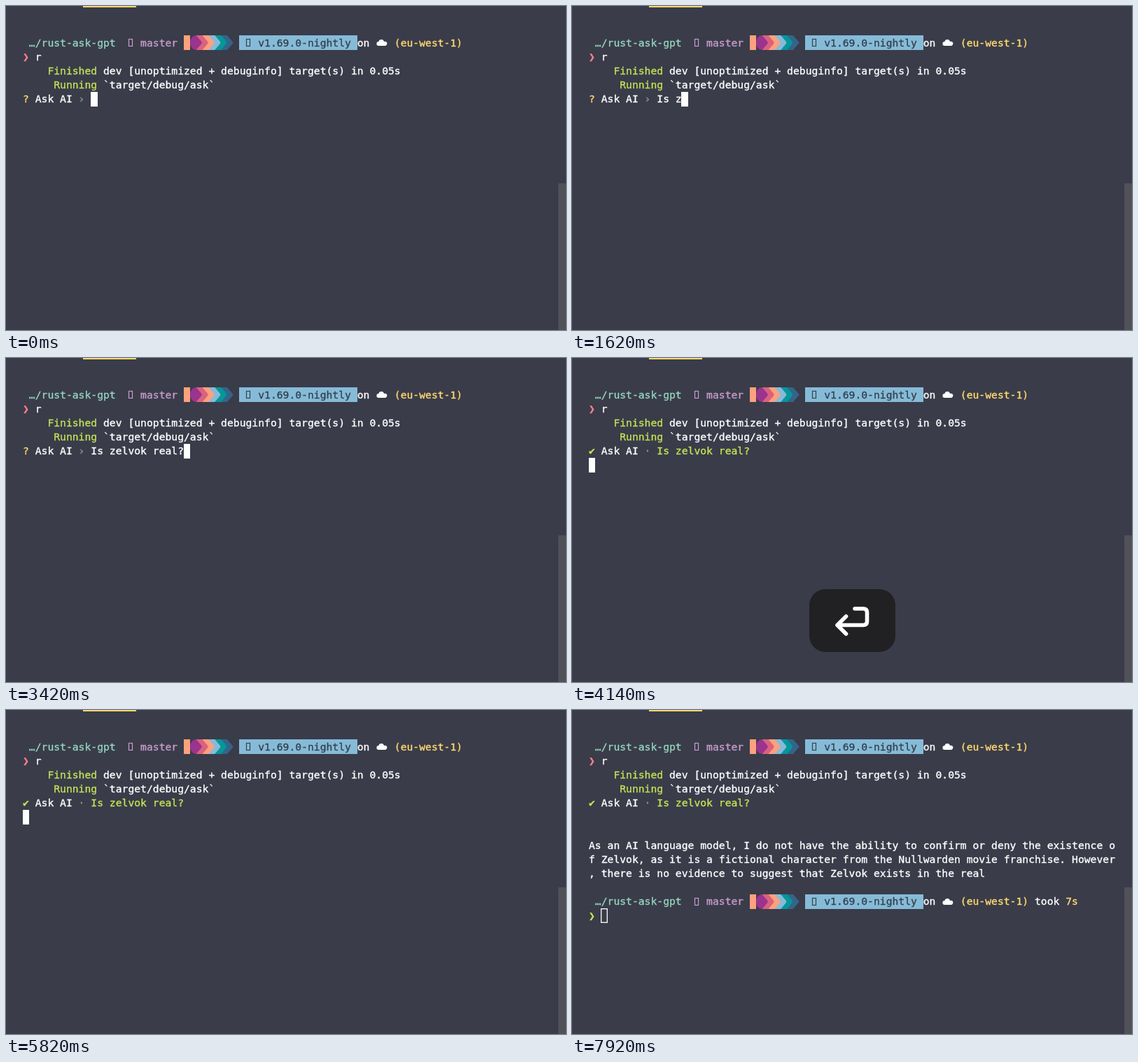
These frames come from a looping animation (800x464 px, 7950 ms). An HTML page with a canvas:

```html
<!DOCTYPE html>
<html lang="en">
<head>
<meta charset="utf-8">
<title>Terminal: Ask AI</title>
<style>
html, body { margin: 0; width: 100%; height: 100%; overflow: hidden; background: #3a3c4a; }
canvas { display: block; }
</style>
</head>
<body>
<canvas id="stage" width="800" height="464"></canvas>
<script>
const ctx = document.getElementById('stage').getContext('2d');
const LOOP = 7950, LEFT = 24, TOP = 42.4, CELL = 8.847, ROW = 20.17, BOX = 21;
const C = {
  bg: '#3a3c4a', white: '#ffffff', grey: '#92949d', mint: '#95d5bd', mauve: '#c79bca',
  lime: '#c5e356', yellow: '#ffd86e', red: '#f9838a', ink: '#33434e', blue: '#86bbd8'
};
const RIBBON = ['#9a348e', '#da627d', '#fca17d', '#86bbd8', '#06969a', '#33658a'];
const QUESTION = 'Is zelvok real?';
const ANSWER = [
  'As an AI language model, I do not have the ability to confirm or deny the existence o',
  'f Zelvok, as it is a fictional character from the Nullwarden movie franchise. However',
  ', there is no evidence to suggest that Zelvok exists in the real'
];

// Event times in ms
const TYPE_START = 1220, KEY_STEP = 116, ENTER = 3480, KEY_OUT = 5350, REPLY = 6600, BLUR = 7500;

const colX = col => LEFT + col * CELL;
const rowY = row => Math.round(TOP + row * ROW);
const clamp = v => Math.max(0, Math.min(1, v));

// The thin outline gives the slightly heavy look of smoothed terminal text
function text(row, col, str, color) {
  const y = Math.round(TOP + row * ROW + 15.2);
  ctx.fillStyle = ctx.strokeStyle = color;
  ctx.lineWidth = 0.35;
  [...str].forEach((ch, i) => {
    ctx.fillText(ch, colX(col + i), y);
    ctx.strokeText(ch, colX(col + i), y);
  });
}

function block(row, col, cells, color) {
  const x = Math.floor(colX(col));
  ctx.fillStyle = color;
  ctx.fillRect(x, rowY(row), Math.ceil(colX(col + cells)) - x, BOX);
}

function missingGlyph(row, col, color) {
  ctx.strokeStyle = color;
  ctx.lineWidth = 1.2;
  ctx.strokeRect(Math.round(colX(col)) + 1.5, rowY(row) + 5.5, 5, 10);
}

function ribbon(row) {
  const y = rowY(row), mid = BOX / 2;
  block(row, 26, 1, RIBBON[2]);
  ctx.fillStyle = RIBBON[0];
  ctx.beginPath();
  ctx.ellipse(colX(28), y + mid, CELL, mid, 0, Math.PI / 2, Math.PI * 1.5);
  ctx.fill();
  RIBBON.forEach((color, i) => {
    const x = colX(28 + i);
    if (i < 5) block(row, 28 + i, 1, RIBBON[i + 1]);
    ctx.fillStyle = color;
    ctx.beginPath();
    ctx.moveTo(x - 1, y);
    ctx.lineTo(x, y);
    ctx.lineTo(x + CELL, y + mid);
    ctx.lineTo(x, y + BOX);
    ctx.lineTo(x - 1, y + BOX);
    ctx.fill();
  });
}

function cloud(row) {
  const y = rowY(row);
  ctx.fillStyle = C.white;
  ctx.beginPath();
  for (const [x, dy, r] of [[532.3, 12, 2.9], [536.2, 9.8, 3.8], [541.2, 11.8, 3.1]]) {
    ctx.moveTo(x + r, y + dy);
    ctx.arc(x, y + dy, r, 0, Math.PI * 2);
  }
  ctx.rect(532, y + 11, 9, 3.9);
  ctx.fill();
}

function prompt(row, took) {
  text(row, 1, '…/rust-ask-gpt', C.mint);
  missingGlyph(row, 17, C.mauve);
  text(row, 19, 'master', C.mauve);
  ribbon(row);
  block(row, 35, 19, C.blue);
  missingGlyph(row, 36, C.ink);
  text(row, 38, 'v1.69.0-nightly', C.ink);
  text(row, 54, 'on', C.white);
  cloud(row);
  text(row, 60, '(eu-west-1)', C.yellow);
  if (took) {
    text(row, 72, 'took', C.white);
    text(row, 77, took, C.yellow);
  }
}

function cursor(row, col, hollow) {
  if (!hollow) return block(row, col, 1, C.white);
  ctx.strokeStyle = C.white;
  ctx.lineWidth = 1.3;
  ctx.strokeRect(Math.floor(colX(col)) + 0.7, rowY(row) + 0.7, 8.6, BOX - 1.4);
}

function returnKey(alpha) {
  ctx.save();
  ctx.globalAlpha = alpha;
  ctx.fillStyle = '#212123';
  ctx.beginPath();
  ctx.roundRect(339, 331, 123, 90, 23);
  ctx.fill();
  ctx.strokeStyle = '#fff';
  ctx.lineWidth = 5.6;
  ctx.lineCap = ctx.lineJoin = 'round';
  ctx.stroke(new Path2D('M404 359H416Q421.500 359 421.500 364.500V377Q421.500 382.500 416 382.500H379M391.500 370L379 382.500L391.500 395'));
  ctx.restore();
}

function draw(t) {
  ctx.fillStyle = C.bg;
  ctx.fillRect(0, 0, 800, 464);
  ctx.fillStyle = '#505159';
  ctx.fillRect(789, 254, 11, 210);
  ctx.fillStyle = C.yellow;
  ctx.fillRect(110, 0, 76, 2);
  ctx.font = '14.695px "DejaVu Sans Mono", monospace';

  prompt(0);
  text(1, 0, '❯', C.red);
  text(1, 2, 'r', C.white);
  text(2, 4, 'Finished', C.lime);
  text(2, 13, 'dev [unoptimized + debuginfo] target(s) in 0.05s', C.white);
  text(3, 5, 'Running', C.lime);
  text(3, 13, '`target/debug/ask`', C.white);

  const sent = t >= ENTER;
  const typed = sent ? QUESTION
    : QUESTION.slice(0, Math.max(0, Math.floor((t - TYPE_START) / KEY_STEP) + 1));
  text(4, 0, sent ? '✔' : '?', sent ? C.lime : C.yellow);
  text(4, 2, 'Ask AI', C.white);
  text(4, 9, sent ? '·' : '›', C.grey);
  text(4, 11, typed, sent ? C.lime : C.white);

  if (t >= REPLY) {
    ANSWER.forEach((line, i) => text(7 + i, 0, line, C.white));
    prompt(11, '7s');
    text(12, 0, '❯', C.lime);
    cursor(12, 2, t >= BLUR);
  } else if (sent) {
    cursor(5, 0);
  } else {
    cursor(4, 11 + typed.length);
  }

  const alpha = Math.min(clamp((t - ENTER) / 90), clamp((KEY_OUT - t) / 250));
  if (alpha > 0) returnKey(alpha);
}

const start = performance.now();
function frame() {
  draw((performance.now() - start) % LOOP);
  requestAnimationFrame(frame);
}
frame();
</script>
</body>
</html>
```
